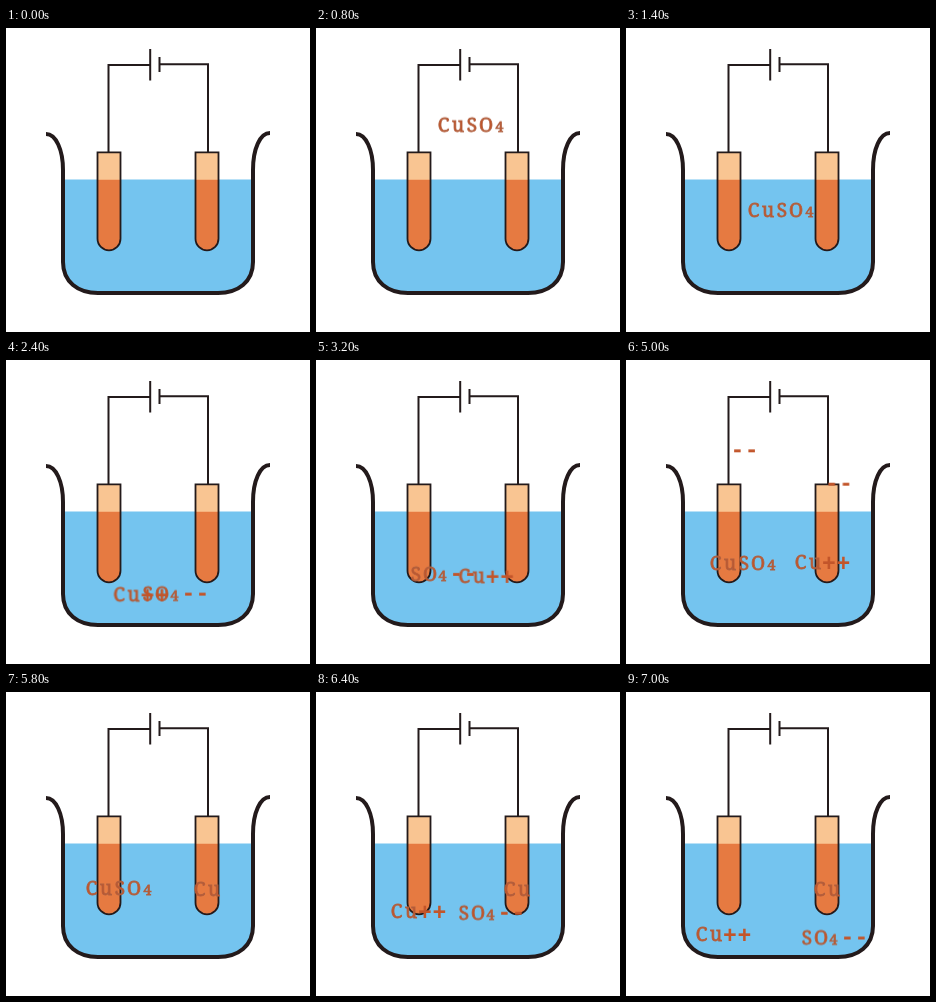
An HTML page for the animation above (8 s loop, 304 px wide and 304 px high).

```html
<!DOCTYPE html>
<html lang="en">
<head>
<meta charset="utf-8">
<title>Electrolysis of copper sulfate</title>
<style>
html, body { margin: 0; width: 100%; height: 100%; overflow: hidden; background: #fff; }
svg { display: block; width: 100%; height: 100%; }
.line { fill: none; stroke: #231a1b; }
.rod { stroke: #231a1b; stroke-width: 1.8; }

text {
  font: 19px "Noto Serif", serif;
  text-anchor: middle;
  fill: #c2552a;
  stroke: #ae6041;
  stroke-width: .8px;
}
.sub { font-size: 14px; }
.sign {
  font: bold 23px "Liberation Mono", monospace;
  stroke: none;
}

/* one tick is 200 ms = 2.5% of the loop */
.part { animation: 8s infinite step-end; }
#salt { animation-name: salt, salt-show; }
#copper { animation-name: copper, copper-show; }
#sulfate { animation-name: sulfate, sulfate-show; }
#metal { animation-name: metal-show; transform: translate(187px, 204px); }
#rising { animation-name: rising, charge-show; }
#falling { animation-name: falling, charge-show; }

@keyframes salt {
  0% { transform: translate(121px, -10px); animation-timing-function: steps(7); }
  17.5% { transform: translate(121px, 189px); }
  47.5% { transform: translate(83px, 210px); }
  72.5%, 100% { transform: translate(79px, 203px); }
}
@keyframes salt-show {
  0% { opacity: 1; }
  20% { opacity: 0; }
  47.5% { opacity: 1; }
  75%, 100% { opacity: 0; }
}

@keyframes copper {
  0% { transform: translate(121px, 189px); }
  17.5% { transform: translate(121px, 189px); animation-timing-function: steps(3); }
  25% { transform: translate(89px, 250.5px); animation-timing-function: steps(9); }
  47.5% { transform: translate(168px, 209px); }
  72.5% { transform: translate(79px, 203px); animation-timing-function: steps(6); }
  87.5%, 100% { transform: translate(69px, 249px); }
}
@keyframes copper-show {
  0% { opacity: 0; }
  20% { opacity: 1; }
  72.5% { opacity: 0; }
  75%, 100% { opacity: 1; }
}

@keyframes sulfate {
  0% { transform: translate(150px, 189px); }
  17.5% { transform: translate(150px, 189px); animation-timing-function: steps(3); }
  25% { transform: translate(157px, 250.5px); animation-timing-function: steps(9); }
  47.5% { transform: translate(62.5px, 206px); }
  72.5% { transform: translate(109px, 203px); animation-timing-function: steps(6); }
  87.5%, 100% { transform: translate(175px, 252.5px); }
}
@keyframes sulfate-show {
  0% { opacity: 0; }
  20% { opacity: 1; }
  47.5% { opacity: 0; }
  75%, 100% { opacity: 1; }
}

@keyframes metal-show {
  0% { opacity: 0; }
  72.5%, 100% { opacity: 1; }
}

@keyframes rising {
  0% { transform: translate(104px, 209.6px); }
  47.5% { transform: translate(104px, 209.6px); animation-timing-function: steps(9); }
  70%, 100% { transform: translate(108.5px, 31.5px); }
}
@keyframes falling {
  0% { transform: translate(174px, 26.5px); }
  47.5% { transform: translate(174px, 26.5px); animation-timing-function: steps(9); }
  70%, 100% { transform: translate(215px, 173px); }
}
@keyframes charge-show {
  0% { opacity: 0; }
  47.5% { opacity: 1; }
  72.5%, 100% { opacity: 0; }
}
</style>
</head>
<body>
<svg viewBox="0 0 304 304">
  <defs>
    <g id="rod">
      <path fill="#f9c592" d="M0 0H23V28H0Z"/>
      <path fill="#e67a41" d="M0 27.5H23V86.5A11.5 11.5 0 0 1 0 86.5Z"/>
      <path class="rod" fill="none" d="M0 0H23V86.5A11.5 11.5 0 0 1 0 86.5Z"/>
    </g>
  </defs>

  <path fill="#74c4ef" d="M57 151.5H247V234C247 254 232 265 212 265H92C72 265 57 254 57 234Z"/>
  <path class="line" stroke-width="4" d="M40 106C50 106 57 122 57 142V234C57 254 72 265 92 265H212C232 265 247 254 247 234V142C247 121 254 105 264 105"/>
  <path class="line" stroke-width="2" d="M102.5 124V37H144M154 36.3H202V124M144.2 21V52.5M153.5 29V44"/>
  <use href="#rod" x="91.5" y="124.3"/>
  <use href="#rod" x="189.5" y="124.3"/>

  <g class="part" id="sulfate"><text x="6 20 32.5 46.5 60.3">SO<tspan class="sub">4</tspan><tspan class="sign">--</tspan></text></g>
  <g class="part" id="copper"><text x="6.5 21 35 49.3">Cu<tspan class="sign" dy="1.5">++</tspan></text></g>
  <g class="part" id="salt"><text x="6.5 21 35 49 62.5">CuSO<tspan class="sub">4</tspan></text></g>
  <g class="part" id="metal"><text x="6.5 21">Cu</text></g>
  <g class="part" id="rising"><text class="sign" x="4.5 18.7" y="6.2">--</text></g>
  <g class="part" id="falling"><text class="sign" x="4.5 18.7" y="6.2">--</text></g>
</svg>
</body>
</html>
```
